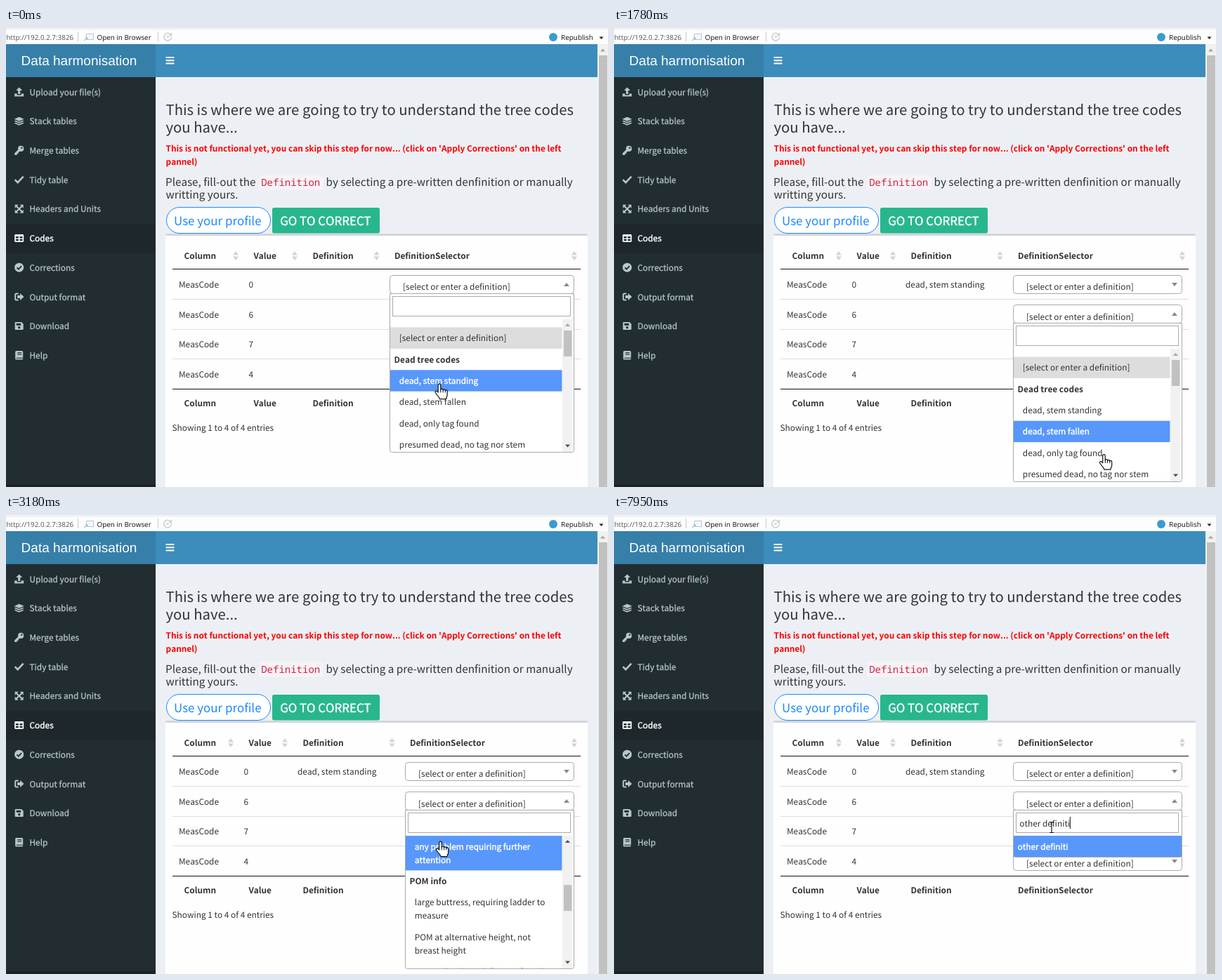
An HTML page that plays this animation: 857x654 px, repeating every 8000 ms.

```html
<!DOCTYPE html>
<html lang="en">
<head>
<meta charset="utf-8">
<title>Data harmonisation</title>
<style>
html, body { margin: 0; width: 100%; height: 100%; overflow: hidden; background: #fff; }
svg { display: block; font-family: "Noto Sans CJK JP", "Noto Sans CJK SC", "Noto Sans CJK", "Noto Sans", sans-serif; }
text { fill: #333; white-space: pre; text-rendering: geometricPrecision; font-kerning: none; }
.b { font-weight: 700; }
.lit { fill: #fff; stroke: #fff; stroke-width: .4; }
.nav { fill: #b8c7ce; stroke: #b8c7ce; stroke-width: .25; }
.bar { font-family: "Open Sans", sans-serif; }
.logo { font-family: "Liberation Sans", sans-serif; fill: #fff; }
.code { font-family: "Noto Sans Mono", monospace; fill: #c7254e; }
</style>
</head>
<body>
<svg width="857" height="654" viewBox="0 0 857 654">
  <defs><clipPath id="clip"><rect id="clipBox"/></clipPath></defs>
  <g id="page"></g>
  <g id="table"></g>
  <g id="pointer"></g>
</svg>
<script>
const $ = id => document.getElementById(id);
const EM = 1.117;            // the CJK family draws its Latin letters larger by this factor
const ROW = 42.6, ITEM = 30.4, LINE = 18.9, LIST_H = 189.5;
const PROMPT = '[select or enter a definition]';

const raw = (x, y, s, size, attrs = '') => `<text x="${x}" y="${y}" font-size="${size}" ${attrs}>${s}</text>`;
const text = (x, y, s, attrs = '', size = 13.24) => raw(x, y, s, (size / EM).toFixed(2), attrs);
const box = (x, y, w, h, fill, attrs = '') => `<rect x="${x}" y="${y}" width="${w}" height="${h}" fill="${fill}" ${attrs}/>`;
const path = (d, fill, attrs = '') => `<path d="${d}" fill="${fill}" ${attrs}/>`;
const line = (d, color, w, attrs = '') => path(d, 'none', `stroke="${color}" stroke-width="${w}" ${attrs}`);

// ---------- fixed page ----------
function icon(i, c, bg) {
  const f = d => path(d, c), s = (d, w, k = c) => line(d, k, w);
  return [
    () => f('M0-6.5L4.5-2H1.6V3H-1.6V-2H-4.5ZM-6.5 2.5H-3v2H3v-2h3.5v4h-13z'),
    () => f('M0-6L7-3 0 0-7-3ZM-7 0l2-.9L0 1.4 5-.9 7 0 0 3zM-7 3l2-.9L0 4.4 5 2.1 7 3 0 6z'),
    () => `<circle cx="2.5" cy="-2.5" r="4.1" fill="${c}"/>` + f('M-.8-1.6L-6.5 4v2.5H-3v-2h2v-2L1.5 1z') +
      `<circle cx="3.7" cy="-3.7" r="1.2" fill="${bg}"/>`,
    () => s('M-6 0L-2 4 6-4.5', 2.6),
    () => s('M-4-4L4 4M4-4L-4 4', 2) + f('M-6-6h5l-5 5zM6-6v5l-5-5zM-6 6v-5l5 5zM6 6H1l5-5z'),
    () => box(-6.5, -5.5, 13, 11, c, 'rx="1.4"') +
      [-4.8, .8].map(x => [-2.4, 1.3].map(y => box(x, y, 4, 2.4, bg)).join('')).join(''),
    () => `<circle r="6.5" fill="${c}"/>` + s('M-3.2 .2L-.9 2.5 3.4-2', 1.8, bg),
    () => f('M-1-5.5h-3q-2.5 0-2.5 2.5v6q0 2.5 2.5 2.5h3v-2h-3q-.5 0-.5-.5v-6q0-.5.5-.5h3zM-2.5-2h4v-3L6.8 0 1.5 5V2h-4z'),
    () => f('M-6-4.5q0-1 1-1H3.3L6-2.8V4.5q0 1-1 1H-5q-1 0-1-1z') + box(-4, -3.8, 6.5, 3, bg) +
      `<circle cy="2.2" r="1.7" fill="${bg}"/>`,
    () => box(-5.5, -6.3, 11, 12.6, c, 'rx="1.5"') + s('M-2.5-3.4h6M-2.5-1h6M-4 4h9.5', 1.1, bg)
  ][i]();
}

function drawPage() {
  const menu = ['Upload your file(s)', 'Stack tables', 'Merge tables', 'Tidy table', 'Headers and Units',
    'Codes', 'Corrections', 'Output format', 'Download', 'Help'];
  const active = 5;
  let o = box(0, 0, 857, 23, '#fdfdfd') + box(0, 1, 857, 1, '#e3e3e3');
  o += raw(0.5, 17, 'http://192.0.2.7:3826', 9.85, 'class="bar" style="fill:#555"');
  o += box(102, 5, 1, 14, '#ccc') + box(216, 5, 1, 14, '#ccc');
  o += box(114.5, 8.5, 10, 8, '#f4f8fb', 'stroke="#b4c6d4"') + line('M111 18l5-4m-3-.5l3 .5-.5 3', '#a9c4d8', 1.4);
  o += raw(129.5, 17.2, 'Open in Browser', 9.85, 'class="bar" style="fill:#111"');
  o += line('M234.5 9.5a5.4 5.4 0 1 0 1 3M235.5 7v3.5H232', '#c9cdd0', 1.5) + `<circle cx="230" cy="12.5" r="2" fill="#dde0e2"/>`;
  o += `<circle cx="779" cy="13" r="6" fill="#3a9bd0"/>`;
  o += raw(790, 17.2, 'Republish', 9.95, 'class="bar" style="fill:#111"') + path('M844.5 12.5h6l-3 3.4z', '#222');

  o += box(213, 23, 629, 47, '#3c8dbc') + box(0, 23, 213, 47, '#367fa9');
  o += raw(104, 53, 'Data harmonisation', 19, 'class="logo" text-anchor="middle"');
  for (const y of [41, 45.2, 49.4]) o += box(227.5, y, 12, 2.1, '#fff', 'rx=".5"');

  o += box(0, 70, 213, 584, '#222d32') + box(0, 279, 213, 41.5, '#1e282c') + box(0, 650, 213, 4, '#1a2327');
  menu.forEach((s, i) => {
    const y = 91 + 41.7 * i, on = i === active;
    o += `<g transform="translate(18.7 ${y})">${icon(i, on ? '#fff' : '#b8c7ce', on ? '#1e282c' : '#222d32')}</g>`;
    o += text(33.5, y + 4.6, s, `class="${on ? 'lit' : 'nav'}"`);
  });

  o += box(213, 70, 629, 584, '#ecf0f5');
  o += box(842, 23, 15, 631, '#f1f1f1') + box(844, 39, 12, 615, '#c1c1c1') + path('M846 33.5h7l-3.5-4z', '#a3a3a3');
  o += text(227.5, 123.6, 'This is where we are going to try to understand the tree codes', '', 22.69);
  o += text(227.5, 148.5, 'you have...', '', 22.69);
  o += text(227.5, 176.4, "This is not functional yet, you can skip this step for now... (click on 'Apply Corrections' on the left", 'class="b" style="fill:#f00"');
  o += text(227.5, 195.3, 'pannel)', 'class="b" style="fill:#f00"');
  o += text(227, 224.6, 'Please, fill-out the', '', 17.02) + box(360, 209.5, 91.5, 21, '#f9f2f4', 'rx="3.5"');
  o += raw(363.2, 224.6, 'Definition', 14, 'class="code"');
  o += text(455.5, 224.6, 'by selecting a pre-written denfinition or manually', '', 17.05);
  o += text(227.5, 243.2, 'writting yours.', '', 17.02);

  o += box(227, 294, 601, 364, '#d9dde2', 'rx="3"') + box(227, 293, 601, 364, '#fefefe', 'rx="3"') +
    box(227, 293, 601, 3, '#d2d6de', 'rx="1.5"');
  o += box(228.5, 255.5, 148, 37, '#fff', 'rx="18.5" stroke="#1d89ff"') + box(379, 256, 153, 36.5, '#28b78d', 'rx="2.5"');
  o += text(239, 280.7, 'Use your profile', 'style="fill:#1d89ff"', 18.9);
  o += text(390.2, 280.7, 'GO TO CORRECT', 'class="lit"', 18.8);
  $('page').innerHTML = o;
}

// ---------- drop-down ----------
const option = (...lines) => ({ lines });
const group = s => ({ lines: [s], group: true });
const fullList = [
  { lines: [PROMPT], chosen: true },
  group('Dead tree codes'), option('dead, stem standing'), option('dead, stem fallen'),
  option('dead, only tag found'), option('presumed dead, no tag nor stem'),
  group('Other info'), option('stem broken'), option('multiple stems'),
  option('any problem requiring further', 'attention'),
  group('POM info'), option('large buttress, requiring ladder to', 'measure'),
  option('POM at alternative height, not', 'breast height'), option('some other bole deformity found')
];

function matches(q) {
  const tail = q === 'ot'
    ? [group('Other info'), group('POM info'), option('POM at alternative height, not breast', 'height')]
    : 'other info'.startsWith(q) ? [group('Other info')] : [];
  return [{ lines: [q], tag: true }, ...tail];
}

function drawList(items, x, y, right, hot) {
  let o = '';
  items.forEach((it, i) => {
    const h = ITEM + LINE * (it.lines.length - 1), lit = i === hot;
    if (lit || it.chosen) o += box(x, y, right - x, h, lit ? '#5897fb' : '#ddd');
    const cls = it.group ? 'class="b"' : lit ? 'class="lit"' : '';
    it.lines.forEach((s, k) => o += text(x + (it.group || it.tag ? 5.6 : 12.8), y + 19.6 + LINE * k, s, cls));
    y += h;
  });
  return { o, end: y };
}

function drawDrop(s, x, top) {
  const listY = top + 62.5, typed = s.q !== '';
  const list = typed ? drawList(matches(s.q), x + .5, listY, 808, 0)
    : drawList(fullList, x + .5, listY + 11.5 - s.scroll, 791.5, s.hot);
  const bottom = Math.floor(typed ? list.end : listY + LIST_H) + .5, h = bottom - listY - .5;
  const clip = { x: x + .5, y: listY, width: 808 - x, height: h };
  for (const k in clip) $('clipBox').setAttribute(k, clip[k]);

  let o = path(`M${x} ${top + 26}H808.5V${bottom - 3}q0 3-3 3H${x + 3}q-3 0-3-3z`, '#fff', 'stroke="#aaa"');
  o += box(x + 4, top + 30, 799.5 - x, 28, '#fff', 'stroke="#aaa"');
  o += text(x + 8.8, top + 49, s.q, 'id="query"');
  o += `<g clip-path="url(#clip)">${list.o}</g>`;
  if (!typed) {
    o += box(792, listY, 14, h, '#f1f1f1') + box(794, listY + 16 + s.scroll * .19, 11.5, 37, '#c1c1c1');
    o += path(`M796 ${listY + 10}h7l-3.5-4z`, s.scroll ? '#505050' : '#a3a3a3');
    o += path(`M796 ${bottom - 11}h7l-3.5 4z`, '#505050');
  }
  return o;
}

// ---------- table ----------
function drawTable(s) {
  const heads = s.wide ? [254, 353, 437, 553.5] : [254, 346, 423, 575.5];
  const sorts = s.wide ? [327, 411, 527.5, 809] : [320, 397, 549.5, 809];
  const left = s.wide ? 546.5 : 568.5;
  const boxTop = i => Math.round(351.7 + ROW * i) + .5;
  const rule = (y, c) => box(237, y, 581, 1, c);
  let o = '';
  ['Column', 'Value', 'Definition', 'DefinitionSelector'].forEach((h, i) => {
    o += text(heads[i] - .5, 329, h, 'class="b"') + text(heads[i] - .5, 538.6, h, 'class="b"');
    o += path(`M${sorts[i] - 4} 323.5l4-5.5 4 5.5zM${sorts[i] - 4} 325.5l4 5.5 4-5.5z`, '#d3d3d3');
  });
  [0, 6, 7, 4].forEach((v, i) => {
    const y = 370.1 + ROW * i, top = boxTop(i);
    if (s.hover === i) o += box(237, 344 + ROW * i, 581, ROW, '#f5f5f5');
    if (i) o += rule(Math.round(343.4 + ROW * i), '#ddd');
    o += text(246, y, 'MeasCode') + text(heads[1] - 7.5, y, v);
    if (!i && !s.wide) o += text(415, y, 'dead, stem standing');
    o += box(left, top, 808.5 - left, 26, '#fff', 'rx="4" stroke="#aaa"');
    o += text(left + 18.6, y + 2.9, !i && s.pick ? 'dead, stem standing' : PROMPT);
    o += path(s.open === i ? `M794 ${top + 15.5}h8l-4-5z` : `M794 ${top + 10.5}h8l-4 5z`, '#888');
  });
  o += rule(343, '#111') + rule(514, '#111') + text(236.5, 573.6, 'Showing 1 to 4 of 4 entries');
  if (s.open >= 0) o += drawDrop(s, left, boxTop(s.open));
  $('table').innerHTML = o;

  if (s.caret) {
    const x = 577.5 + $('query').getComputedTextLength();
    $('table').insertAdjacentHTML('beforeend', line(`M${x} 430V447`, '#111', 1));
  }
}

function drawPointer([x, y, beam]) {
  const hand = 'M-1.8 1.5a1.8 1.8 0 0 1 3.6 0V8.2q0-1.6 1.6-1.6t1.7 1.6v.6q.2-1.4 1.6-1.4t1.6 1.6v.6q.3-1.2 1.5-1.2t1.4 1.5' +
    'v5.2q0 2-1.1 3.6l-.6 2.4H.2l-.5-2q-3-3.3-5.6-7.4q-.6-1.5.6-2t2 .4l1.5 1.6z';
  $('pointer').setAttribute('transform', `translate(${x} ${y})`);
  $('pointer').innerHTML = beam
    ? line('M-3-7.5h2.5l.5.5.5-.5H3M0-7V7M-3 7.5h2.5L0 7l.5.5H3', '#111', 1.2)
    : path(hand, '#fff', 'stroke="#111" stroke-width="1.2" stroke-linejoin="round"') +
      line('M1.8 8v4M5.1 8.5v3.5M8.3 9.5V12', '#111', 1);
}

// ---------- timeline: each step changes part of the state ----------
const start = { wide: true, open: 0, scroll: 0, hot: 2, hover: -1, pick: false, q: '', caret: false, at: [617, 507.5] };
const steps = [
  [120, { open: -1, pick: true }],
  [270, { wide: false, pick: false }],
  [400, { hover: 3 }],
  [830, { at: [618, 470], hover: 2 }],
  [950, { at: [618, 428], hover: 1 }],
  [1100, { at: [618, 407] }],
  [1220, { open: 1, hot: 0, hover: -1 }],
  [1350, { at: [619, 414] }],
  [1780, { at: [697.5, 608], hot: 3 }],
  [1900, { at: [697.5, 612.5], hot: 4 }],
  [2050, { scroll: 190, hot: -1 }],
  [2200, { scroll: 285 }],
  [2800, { hot: 12 }],
  [3060, { at: [660, 553], hot: 11 }],
  [3180, { at: [618.5, 465.5], hot: 9 }],
  [3300, { at: [620, 456] }],
  [3430, { at: [623, 449, true] }],
  [3550, { at: [623, 447, true] }],
  [3690, { at: [623, 445, true] }],
  [3950, { caret: true }],
  [4540, { caret: false }],
  [4810, { q: 'ot', caret: true }],
  [4960, { q: 'othe' }],
  [5110, { q: 'other' }],
  [5260, { q: 'other ' }],
  [5410, { q: 'other de' }],
  [5950, { caret: false }],
  [6250, { q: 'other defi', caret: true }],
  [6810, { caret: false }],
  [7270, { caret: true }],
  [7680, { q: 'other defin' }],
  [7830, { q: 'other definit' }],
  [7950, { q: 'other definiti' }]
];

let shown = -1;
function render(t) {
  const past = steps.filter(([at]) => at <= t);
  if (past.length === shown) return;
  shown = past.length;
  const s = Object.assign({}, start, ...past.map(p => p[1]));
  drawTable(s);
  drawPointer(s.at);
}

drawPage();
render(0);
const t0 = performance.now();
(function tick() {
  render((performance.now() - t0) % 8000);
  requestAnimationFrame(tick);
})();
</script>
</body>
</html>
```
